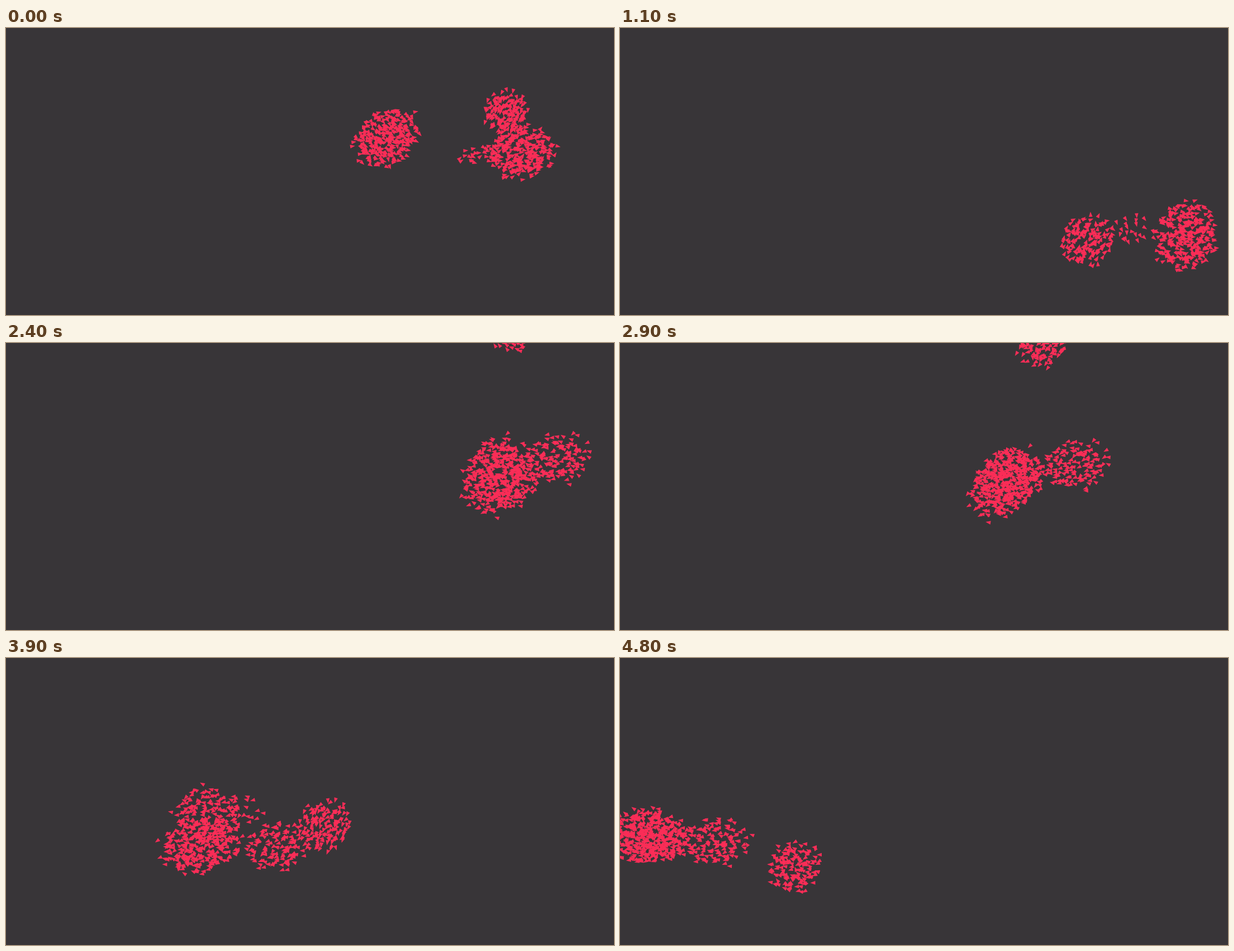
Write an HTML page with a canvas that moves like this. It is 1088 px wide and 515 px high and loops after 4.9 s.

```html
<!DOCTYPE html>
<html lang="en">
<head>
<meta charset="utf-8">
<title>Flock</title>
<style>
  html, body { margin: 0; width: 100%; height: 100%; overflow: hidden; background: #383538; }
  canvas { display: block; }
</style>
</head>
<body>
<canvas id="stage" width="1088" height="515"></canvas>
<script>
const LOOP = 4900, STEP = 100, TAU = Math.PI * 2;
const ctx = document.getElementById('stage').getContext('2d');

function random(seed) {
  return () => {
    seed = (seed + 0x6D2B79F5) | 0;
    let t = Math.imul(seed ^ (seed >>> 15), 1 | seed);
    t = (t + Math.imul(t ^ (t >>> 7), 61 | t)) ^ t;
    return ((t ^ (t >>> 14)) >>> 0) / 4294967296;
  };
}

const bump = (t, mid, width) => Math.exp(-(((t - mid) / width) ** 2));

// path: [ms, x, y] waypoints; shape: time -> [radius, radius, tilt]
function group(count, spread, path, shape) {
  const rnd = random(count);
  const birds = Array.from({ length: count }, (_, i) => {
    const r = ((i + 0.5) / count) ** 0.54, a = i * 2.39996;
    return {
      x: r * Math.cos(a) + (rnd() - 0.5) * 0.3,
      y: r * Math.sin(a) + (rnd() - 0.5) * 0.3,
      turn: (rnd() + rnd() - 1) * spread,
      phase: rnd() * TAU,
      rate: 1 + rnd() * 1.5
    };
  });
  return { birds, path, shape };
}

const flock = [
  // the leading mass: swings upright in the turn, then flattens out
  group(290, 1, [
    [0, 682, 197], [600, 866, 291], [1100, 1014, 373], [1550, 1132, 315],
    [1900, 1060, 248], [2900, 685, 252], [3900, 347, 337], [4800, 42, 321]
  ], t => [
    72 - 12 * bump(t, 0, 300) - 10 * bump(t, 1100, 250),
    48 + 20 * bump(t, 1800, 700),
    -0.66 - 0.73 * Math.cos(TAU * (t - 1600) / 6400)
  ]),
  // joins the leading mass off stage
  group(140, 1, [
    [0, 921, 222], [600, 1082, 186], [1300, 1205, 220],
    [1900, 1082, 245], [2900, 698, 243], [4800, 60, 320]
  ], t => [58, 50 + 18 * bump(t, 1900, 500), 0]),
  // the tail behind it
  group(125, 0.9, [
    [0, 924, 223], [600, 1092, 186], [1400, 1260, 210],
    [2900, 816, 219], [3900, 484, 339], [4800, 172, 331]
  ], t => [58, 44, -0.15]),
  // the small round group that circles away and returns
  group(145, 1.1, [
    [0, 894, 152], [600, 782, 317], [850, 798, 388], [1100, 836, 380], [1900, 974, 132],
    [2400, 908, -32], [2900, 755, -3], [3900, 570, 301], [4400, 453, 402], [4800, 312, 375]
  ], t => {
    const r = 47 + 10 * bump(t, 600, 250) - 8 * bump(t, 0, 250);
    return [r, r, 0];
  }),
  // strays
  group(24, 1, [
    [0, 848, 229], [600, 1024, 224], [1100, 914, 364],
    [1900, 1085, 250], [2900, 758, 230], [4800, 116, 330]
  ], t => [44, 30 - 14 * bump(t, 0, 700), -0.1])
];

// Smooth position on a path
function locate(path, t) {
  const last = path.length - 1;
  let i = 0;
  while (i < last - 1 && t > path[i + 1][0]) i++;
  const p = path[i], q = path[i + 1];
  const d = q[0] - p[0], s = (t - p[0]) / d, e = s * s * (3 - 2 * s);
  return [1, 2].map(axis => {
    const slope = k => {
      const a = path[Math.max(0, k - 1)], b = path[Math.min(last, k + 1)];
      return (b[axis] - a[axis]) / (b[0] - a[0]);
    };
    return p[axis] + (q[axis] - p[axis]) * e
      + d * s * (1 - s) * ((1 - s) * slope(i) - s * slope(i + 1));
  });
}

function triangle(x, y, angle) {
  const c = Math.cos(angle), s = Math.sin(angle);
  ctx.beginPath();
  ctx.moveTo(x + 5 * c, y + 5 * s);
  ctx.lineTo(x - 4 * c - 3.3 * s, y - 4 * s + 3.3 * c);
  ctx.lineTo(x - 4 * c + 3.3 * s, y - 4 * s - 3.3 * c);
  ctx.fill();
}

function draw(t) {
  ctx.fillStyle = '#383538';
  ctx.fillRect(0, 0, 1088, 515);
  ctx.fillStyle = '#fa2d57';
  for (const { birds, path, shape } of flock) {
    const [x, y] = locate(path, t);
    const [x0, y0] = locate(path, t - 50), [x1, y1] = locate(path, t + 50);
    const heading = Math.atan2(y1 - y0, x1 - x0);
    const [rx, ry, tilt] = shape(t);
    const c = Math.cos(tilt), s = Math.sin(tilt);
    for (const b of birds) {
      const w = b.phase + b.rate * t / 1000;
      const u = (b.x + 0.07 * Math.cos(w)) * rx * 0.95;
      const v = (b.y + 0.07 * Math.sin(w)) * ry * 0.95;
      triangle(x + u * c - v * s, y + u * s + v * c, heading + b.turn + 0.15 * Math.sin(w));
    }
  }
}

const start = performance.now();
let shown = -1;
function tick() {
  const t = Math.floor(((performance.now() - start) % LOOP) / STEP) * STEP;
  if (t !== shown) draw(shown = t);
  requestAnimationFrame(tick);
}
tick();
</script>
</body>
</html>
```
